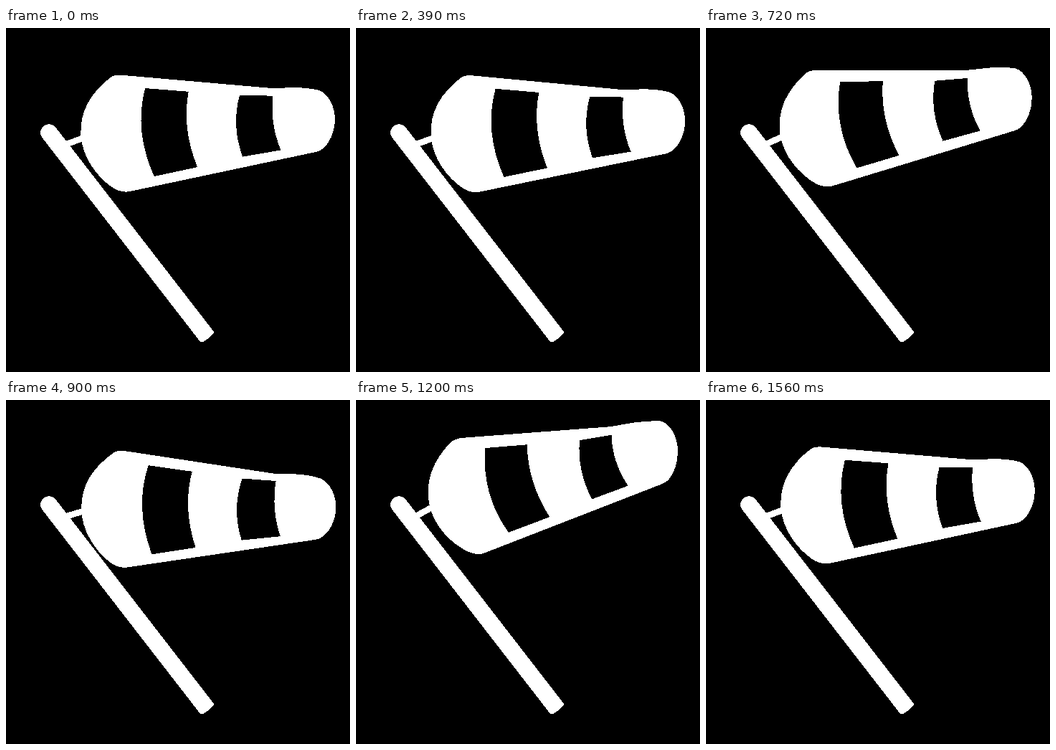
Animation of 480x480 px, one loop 1.59 s. Source, as an HTML page:

```html
<!DOCTYPE html>
<html lang="en">
<head>
<meta charset="utf-8">
<title>Windsock</title>
<style>
  html, body { margin: 0; width: 100%; height: 100%; overflow: hidden; background: #000; }
  svg { display: block; width: 100%; height: 100%; }
</style>
</head>
<body>
<svg viewBox="0 0 480 480" fill="#fff" shape-rendering="crispEdges">
  <path transform="translate(60 146) rotate(52.25)"
    d="M0-11.8A11.8 11.8 0 0 0 0 11.8H359Q362 11.8 362.5 8Q364 0 362.5-8Q362-11.8 359-11.8Z"/>
  <path id="arm" stroke="#fff" stroke-width="8.6"/>
  <path id="sock"/>
  <path id="wide" fill="#000"/>
  <path id="narrow" fill="#000"/>
</svg>
<script>
const LOOP = 1590;
const PIVOT = [82, 160];

// Each part: hanging pose, lifted pose
const poses = {
  arm: ['M82 163L112 153.5', 'M82 163L112 147.5'],
  sock: [
    'M105 150C105 118 121 93 150 72.5Q155 69 165 70.2L374 99.7L405 100.2C418 100.7 430 103 439 106' +
    'C452 112 460.3 129 460.3 146C460.3 164 451 182 440 188.3Q437 190.3 432 191.3L172 232.3' +
    'Q158 235.3 145 225.3C126 211 105 182 105 150Z',
    'M102.7 146C97.5 114 109 86 135 60.5Q140 56.5 149 55.2L358 45.7L393 40.7C405 39.7 416 39.2 427 39.7' +
    'C441 42.7 451.5 62 451.5 82C451.5 100 445 114 437.3 122.3Q434 125.3 429 127.3L178 216.3' +
    'Q168 219.8 154 213.3C133 202 108 178 102.7 146Z'
  ],
  wide: [
    'M198 90L259 98Q246 148 265 204L204 214Q179 148 198 90Z',
    'M183 70L242 67Q241 120 270 169L212 189Q176 135 183 70Z'
  ],
  narrow: [
    'M329 107L376 110Q370 150 383 187L329 193Q315 150 329 107Z',
    'M315 63L360 57Q360 95 381 129L330 146Q310 106 315 63Z'
  ]
};

// Lift over time: 0 is hanging, 1 is lifted
const keys = [
  [0, .285], [210, 0], [285, -.06], [510, .865], [540, .99], [610, 1.17],
  [720, .75], [910, -.06], [1080, .565], [1210, 1.17], [1320, 1], [1560, .3]
];
const count = keys.length;

function key(i) {
  const turn = Math.floor(i / count);
  const [t, v] = keys[i - turn * count];
  return [t + turn * LOOP, v];
}

function chord(i) {
  const [t0, v0] = key(i), [t1, v1] = key(i + 1);
  return (v1 - v0) / (t1 - t0);
}

// Flat at the turning points, smooth elsewhere
function slope(i) {
  const a = chord(i - 1), b = chord(i);
  return a * b <= 0 ? 0 : 2 * a * b / (a + b);
}

function lift(t) {
  let i = count - 1;
  while (keys[i][0] > t) i--;
  const [t0, v0] = key(i), [t1, v1] = key(i + 1);
  const h = t1 - t0, u = (t - t0) / h, w = 1 - u;
  return v0 * (1 + 2 * u) * w * w + v1 * (3 - 2 * u) * u * u +
    h * u * w * (slope(i) * w - slope(i + 1) * u);
}

const point = /([\d.]+) ([\d.]+)/g;
const mix = (a, b, k) => a + (b - a) * k;

// Radius and angle of every point, seen from the pivot
const polar = path => [...path.matchAll(point)].map(([, x, y]) => {
  const dx = x - PIVOT[0], dy = y - PIVOT[1];
  return [Math.hypot(dx, dy), Math.atan2(dy, dx)];
});

const parts = Object.entries(poses).map(([id, [low, high]]) => ({
  node: document.getElementById(id),
  path: low,
  low: polar(low),
  high: polar(high)
}));

function draw(now) {
  const k = lift(now % LOOP);
  for (const { node, path, low, high } of parts) {
    let n = 0;
    node.setAttribute('d', path.replace(point, () => {
      const [r0, a0] = low[n], [r1, a1] = high[n++];
      const r = mix(r0, r1, k), a = mix(a0, a1, k);
      const x = PIVOT[0] + r * Math.cos(a), y = PIVOT[1] + r * Math.sin(a);
      return `${x.toFixed(2)} ${y.toFixed(2)}`;
    }));
  }
}

let start;
function tick(now) {
  start ??= now;
  draw(now - start);
  requestAnimationFrame(tick);
}
draw(0);
requestAnimationFrame(tick);
</script>
</body>
</html>
```
